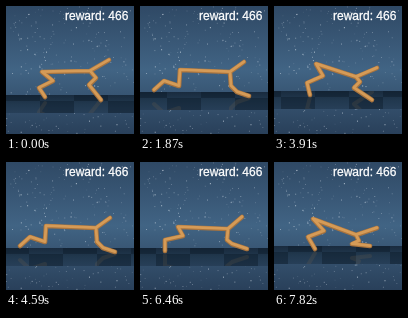
An HTML page with a canvas for the animation above (7.99 s loop, 128 by 128 pixels).

```html
<!DOCTYPE html>
<html lang="en">
<meta charset="utf-8">
<title>Running cheetah</title>
<style>
  html, body { margin: 0; width: 100%; height: 100%; overflow: hidden; background: #2d4661; }
  canvas { display: block; width: 100vw; height: 100vh; }
</style>
<canvas id="stage" width="128" height="128"></canvas>
<script>
const SIZE = 128, STEP = 170, STEPS = 47;
const ctx = document.getElementById('stage').getContext('2d');

// Floor height, then x,y of: rear toe, ankle, knee, hip, shoulder, head, front knee, ankle, toe.
const gather   = [89, 39,91, 33,82, 47,75, 36,66, 84,65, 103,54, 90,72, 83,79, 95,94];
const landing  = [86, 27,90, 28,79, 46,75, 42,60, 86,70, 104,59, 91,74, 87,82, 104,91];
const level    = [85, 28,89, 28,78, 45,75, 35,67, 86,66, 103,55, 90,72, 87,80, 103,88];
const dive     = [85, 36,89, 33,77, 49,70, 42,58, 82,71, 103,62, 86,76, 80,82, 98,94];
const stretch  = [86, 14,84, 24,75, 39,80, 40,64, 90,66, 104,56, 91,80, 97,86, 109,90];
const reach    = [86, 25,89, 25,78, 43,74, 38,65, 88,67, 102,55, 87,78, 92,82, 107,87];
const lowDive  = [84, 41,87, 34,75, 50,69, 39,57, 82,73, 103,66, 85,79, 78,82, 96,84];

const gait = [
  [0, gather], [3.5, stretch], [7, landing], [11, stretch], [15, level],
  [19, stretch], [23, dive], [27, stretch], [31, level], [34.5, stretch],
  [38, reach], [42, stretch], [46, lowDive], [47, gather]
];

const lerp = (a, b, u) => a + (b - a) * u;
const point = (pose, i) => [pose[1 + 2 * i], pose[2 + 2 * i]];

// Turns a limb segment smoothly between two poses.
function swing(from, to, base, tip, origin, u) {
  const polar = pose => {
    const [x0, y0] = point(pose, base), [x1, y1] = point(pose, tip);
    return [Math.hypot(x1 - x0, y1 - y0), Math.atan2(y1 - y0, x1 - x0)];
  };
  const [lengthA, angleA] = polar(from), [lengthB, angleB] = polar(to);
  const turn = Math.atan2(Math.sin(angleB - angleA), Math.cos(angleB - angleA));
  const length = lerp(lengthA, lengthB, u), angle = angleA + turn * u;
  return [origin[0] + length * Math.cos(angle), origin[1] + length * Math.sin(angle)];
}

function poseAt(step) {
  const next = gait.findIndex(([at]) => at > step);
  const [start, from] = gait[next - 1], [end, to] = gait[next];
  const u = (1 - Math.cos(Math.PI * (step - start) / (end - start))) / 2;
  const joints = [];
  joints[3] = point(from, 3).map((v, k) => lerp(v, point(to, 3)[k], u));
  for (const [base, tip] of [[3, 2], [2, 1], [1, 0], [3, 4], [4, 5], [4, 6], [6, 7], [7, 8]]) {
    joints[tip] = swing(from, to, base, tip, joints[base], u);
  }
  return { floor: lerp(from[0], to[0], u), joints };
}

function seeded(seed) {
  return () => (seed = (seed * 16807) % 2147483647) / 2147483647;
}
const random = seeded(4711);
const stars = Array.from({ length: 260 }, () => ({
  x: random() * SIZE, y: random() * SIZE,
  size: 0.6 + random() * 0.5, alpha: 0.2 + random() ** 2 * 0.65
}));

function gradient(y0, y1, ...colors) {
  const fill = ctx.createLinearGradient(0, y0, 0, y1);
  colors.forEach((color, i) => fill.addColorStop(i / (colors.length - 1), color));
  return fill;
}

function drawSky() {
  ctx.fillStyle = gradient(0, SIZE, '#2f4965', '#385674', '#416484', '#35516e', '#29405a');
  ctx.fillRect(0, 0, SIZE, SIZE);
  ctx.fillStyle = '#e2ebf4';
  for (const star of stars) {
    ctx.globalAlpha = star.alpha;
    ctx.fillRect(star.x, star.y, star.size, star.size);
  }
  ctx.globalAlpha = 1;
}

function drawFloor(top, step) {
  ctx.fillStyle = gradient(top, top + 18, '#192b3e', '#21384e', '#273f58');
  ctx.fillRect(0, top, SIZE, 18);
  const tile = 34, shift = step * 13 % (2 * tile);
  ctx.fillStyle = 'rgba(10, 22, 35, .38)';
  for (let row = 0; row < 2; row++) {
    for (let x = row * tile - shift - 2 * tile; x < SIZE; x += 2 * tile) {
      ctx.fillRect(x, top + [0, 6][row], tile, [6, 12][row]);
    }
  }
}

function strokeBody(joints, color, width) {
  ctx.strokeStyle = color;
  ctx.lineWidth = width;
  ctx.lineCap = ctx.lineJoin = 'round';
  ctx.beginPath();
  for (const chain of [[0, 1, 2, 3, 4, 5], [4, 6, 7, 8]]) {
    chain.forEach((joint, i) => ctx[i ? 'lineTo' : 'moveTo'](...joints[joint]));
  }
  ctx.stroke();
}

function drawReflection(joints, top) {
  ctx.save();
  ctx.beginPath();
  ctx.rect(0, top, SIZE, 18);
  ctx.clip();
  ctx.translate(0, 2 * top + 10);
  ctx.scale(1, -1);
  strokeBody(joints, 'rgba(150, 115, 75, .14)', 4);
  ctx.restore();
}

function drawLabel() {
  ctx.font = '12px "Liberation Sans", Arial, sans-serif';
  ctx.fillStyle = ctx.strokeStyle = '#fff';
  ctx.lineWidth = 0.3;
  ctx.fillText('reward: 466', 59, 14);
  ctx.strokeText('reward: 466', 59, 14);
}

function draw(now) {
  const step = Math.floor(now / STEP) % STEPS;
  const { floor, joints } = poseAt(step);
  drawSky();
  drawFloor(floor, step);
  drawReflection(joints, floor);
  strokeBody(joints, '#a9743e', 4.6);
  strokeBody(joints.map(([x, y]) => [x, y - 0.4]), '#d59b57', 2.8);
  drawLabel();
  requestAnimationFrame(draw);
}

const began = performance.now();
draw(Math.max(0, performance.now() - began));
</script>
</html>
```
